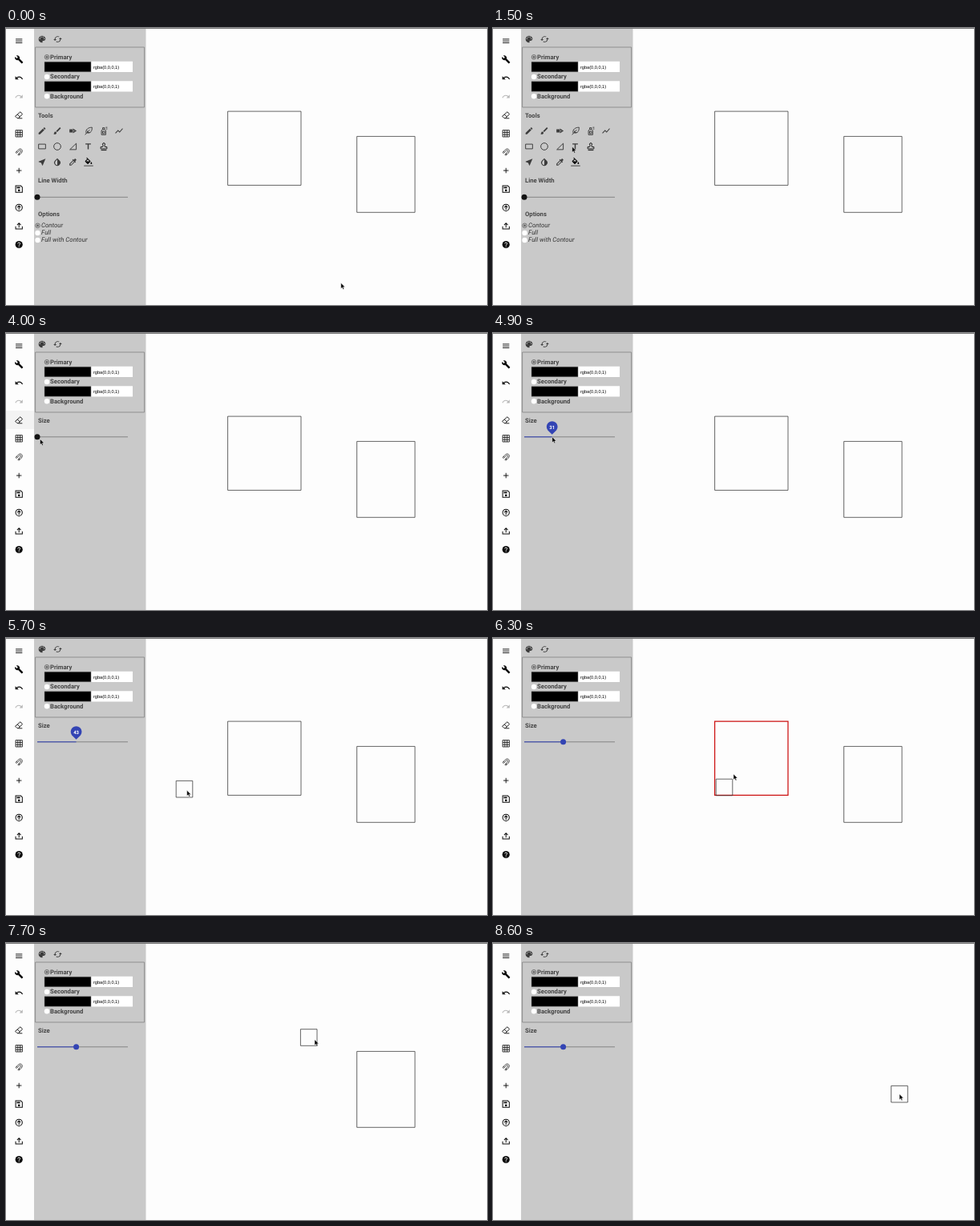
Write an HTML page that moves like this. It is 600 px wide and 346 px high and loops after 9 s.

```html
<!DOCTYPE html>
<html lang="en">
<head>
<meta charset="utf-8">
<title>Eraser tool</title>
<style>
  html, body { margin: 0; width: 100%; height: 100%; overflow: hidden; background: #fdfdfd; }
  svg { display: block; }
  text { font: 700 7.7px Roboto, sans-serif; fill: #444; text-rendering: geometricPrecision; }
  .option { font-size: 7.9px; font-weight: 400; font-style: italic; fill: #333; }
  .value { font: 5.6px "Liberation Sans", sans-serif; fill: #000; }
  #pinText { font-size: 6px; fill: #fff; text-anchor: middle; }
  .shape { fill: none; stroke: #333; stroke-width: .75; }
  .shape.red { stroke: #cc1010; stroke-width: 1.25; }
  .track { stroke: #7d7d7d; stroke-width: .9; }
</style>
</head>
<body>
<svg width="600" height="346" viewBox="0 0 600 346">
  <defs><clipPath id="button"><path d="M0 97h35v23H0z"/></clipPath></defs>
  <g id="hover" clip-path="url(#button)">
    <path id="hoverFill" d="M0 97h35v23H0z"/>
    <circle id="ripple" cx="20" cy="118" fill="#d6d6d6"/>
  </g>
  <path d="M35 0h139.5v346H35z" fill="#c9c9c9"/>
  <path d="M0 .5h600" stroke="#777"/>
  <path d="M36.6 24h136v75h-136z" fill="none" stroke="#888" stroke-width=".9"/>
  <path d="M48 42.3h58v12.4H48zM48 66.8h58v12.4H48z" stroke="#777" stroke-width=".5"/>
  <path d="M106.5 41.7H158v13.4h-51.5zM106.5 66.2H158v13.4h-51.5z" fill="#fff"/>
  <text class="value" x="109" y="50.5">rgba(0,0,0,1)</text>
  <text class="value" x="109" y="75">rgba(0,0,0,1)</text>
  <g id="common"></g>
  <g id="tools"></g>
  <g id="size">
    <text x="40" y="111.7">Size</text>
    <path class="track" d="M39 129.8h113"/>
    <path id="filled" stroke="#3344b4"/>
    <circle id="thumb" cy="129.8" r="3.5"/>
    <g id="pin">
      <path d="M0-3.2L-5.4-8.6A6.9 6.9 0 1 1 5.4-8.6z" fill="#3344b4"/>
      <text id="pinText" y="-10.4"></text>
    </g>
  </g>
  <path id="big" class="shape" d="M276.6 104.1h91.4v92.3h-91.4z"/>
  <path id="small" class="shape" d="M437.7 135.4h72.4v94.9h-72.4z"/>
  <path id="eraser" class="shape" d="M-10.3-10.3h20.6v20.6h-20.6z"/>
  <path id="arrow" d="M0 0v7l1.6-1.5 1.1 2.5 1.2-.5-1.1-2.4h2.2z" stroke="#fff" stroke-width=".4"/>
  <path id="hand" fill="#fff" stroke="#111" stroke-width=".8"
    d="M2.4.5q.9 0 .9 1v2.7l3 .7q1.1.3 1 1.4L6.8 9H3L.6 6q.2-.9 1-.4V1.4q0-.9.8-.9z"/>
</svg>
<script>
const $ = id => document.getElementById(id);

// Icons live on a 24-unit grid and are centred on x, y.
const icon = (x, y, fill, line = '', color = '#3c3c3c', width = 2, scale = .484) =>
  `<g transform="translate(${x} ${y}) scale(${scale}) translate(-12 -12)">
    <path d="${fill}" fill="${color}" fill-rule="evenodd"/>
    <path d="${line}" fill="none" stroke="${color}" stroke-width="${width}"/></g>`;
const side = (row, fill, line, width = 2.2, color = '#0c0c0c') =>
  icon(16.2, 16.2 + row * 23.12, fill, line, color, width, .46);
const label = (x, y, text, kind = '') => `<text class="${kind}" x="${x}" y="${y}">${text}</text>`;
const radio = (x, y, on) => on
  ? `<circle cx="${x}" cy="${y}" r="2.8" fill="#ccc" stroke="#666" stroke-width=".9"/><circle cx="${x}" cy="${y}" r="1.5" fill="#666"/>`
  : `<circle cx="${x}" cy="${y}" r="3.2" fill="#fff"/>`;

const disc = 'M12 2a10 10 0 0 1 0 20a10 10 0 0 1 0-20z';
const ring = 'M12 3a9 9 0 0 1 0 18a9 9 0 0 1 0-18z';

$('common').innerHTML = [
  side(0, '', 'M3 7h18M3 12h18M3 17h18', 2),
  side(1, 'M22.7 19l-9.1-9.1c.9-2.3.4-5-1.5-6.9-2-2-5-2.4-7.4-1.3L9 6 6 9 1.6 4.7C.4 7.1.9 10.1 2.9 12.1c1.9 1.9 4.6 2.4 6.9 1.5l9.1 9.1c.4.4 1 .4 1.4 0l2.3-2.3c.5-.4.5-1.1.1-1.4z'),
  side(2, 'M12.5 8c-2.65 0-5.05 1-6.9 2.6L2 7v9h9l-3.6-3.6c1.4-1.2 3.1-1.9 5.1-1.9 3.5 0 6.5 2.3 7.6 5.5l2.4-.8C21.1 11 17.1 8 12.5 8z'),
  side(3, 'M18.4 10.6C16.5 9 14.1 8 11.5 8c-4.6 0-8.6 3-10 7.2l2.4.8c1-3.2 4-5.5 7.6-5.5 1.9 0 3.7.7 5.1 1.9L13 16h9V7z', '', 2, '#b8b8b8'),
  side(4, '', 'M15.5 3.5l6 6L10.500 20.500H7L2 15.500zM8 11l7 6M10 21h11', 2),
  side(5, '', 'M3 3h18v18H3zM9 3v18M15 3v18M3 9h18M3 15h18', 1.8),
  side(6, '', 'M3 13L10 6C17-1 25 8 18.5 14.5l-7 7L9 19l7-7C19 8 15.5 5.5 12.5 8.5l-7 7zM5.5 10.5L8 13M11.5 16.5L14 19', 1.6),
  side(7, '', 'M5 12h14M12 5v14', 2),
  side(8, 'M6 6h9v4H6zM12 12.5a3 3 0 0 1 0 6a3 3 0 0 1 0-6z', 'M3 3h14l4 4v14H3z'),
  side(9, '', ring + 'M12 18V7M7.5 11.5L12 7l4.5 4.5'),
  side(10, '', 'M3 13v7h18v-7M12 16V4M7 9l5-5 5 5'),
  side(11, disc),
  side(11, '', 'M9 9.5a3 3 0 1 1 4.6 2.4q-1.6 1-1.6 3.3M12 17v2.2', 2, '#fff'),

  icon(45, 14, 'M12 3a9 9 0 0 0 0 18q2.5-.5 1.1-2.5-1-2.3 1.1-2.5H16q4.6-.4 5-5c0-4.4-4-8-9-8z'),
  '<path d="M42.3 13.3h.01M43.8 11.3h.01M46.2 11.3h.01M47.7 13.3h.01" stroke="#c9c9c9" stroke-width="1.4" stroke-linecap="round"/>',
  icon(64.5, 14, 'M19 8l-4 4h3c0 3.3-2.7 6-6 6-1 0-2-.2-2.8-.7l-1.5 1.5Q9.5 20 12 20c4.4 0 8-3.6 8-8h3zM6 12c0-3.3 2.7-6 6-6 1 0 2 .2 2.8.7l1.5-1.5Q14.5 4 12 4c-4.4 0-8 3.6-8 8H1l4 4 4-4z'),

  radio(51, 36.3, true), label(55, 39, 'Primary'),
  radio(51, 61), label(55, 63.3, 'Secondary'),
  radio(51, 85.3), label(55, 87.8, 'Background')
].join('');

$('tools').innerHTML = [
  label(40, 111.7, 'Tools'),
  icon(45, 128.5, 'M3 17.25V21h3.75L17.8 9.9l-3.7-3.7zM20.7 7q.6-.7 0-1.4l-2.3-2.3q-.7-.6-1.4 0l-1.9 1.8 3.8 3.8z'),
  icon(64, 128.5, 'M7 14c-1.7 0-3 1.3-3 3 0 1.3-1.2 2-2 2 .9 1.2 2.5 2 4 2 2.2 0 4-1.8 4-4 0-1.7-1.3-3-3-3zM20.7 4.6l-1.3-1.3q-.7-.6-1.4 0l-9 9 2.7 2.7 9-9q.6-.7 0-1.4z'),
  icon(83.5, 128.5, 'M3 8h8v8H3zM12 6l9.5 6-9.5 6zM14 11v2h2v-2z'),
  icon(103, 128.5, '', 'M3 22L15 9M6 18C3 8 12 3 21 3c0 9-3 16-13 14M9 12v4h6'),
  icon(122, 128.5, '', 'M6 22V11l3-3h5l3 3v11zM9 8V4h5v4M9 13h5v6H9zM17 3h4M18 7h3'),
  icon(141, 128.5, 'M3.5 18.5l6-6 4 4L22 6.9l-1.4-1.4-7.1 8-4-4L2 17z'),
  icon(45, 148, '', 'M3 6h18v12H3z'),
  icon(64, 148, '', ring),
  icon(83.5, 148, '', 'M4 20L20.5 4v16z'),
  icon(102.5, 148, 'M5 4v3h5.5v12h3V7H19V4z'),
  icon(122, 148, '', 'M12 3a3 3 0 0 0-3 3q2 5 0 7H4v5h16v-5h-5q-2-2 0-7a3 3 0 0 0-3-3zM5 21.5h14', '#161616'),
  icon(45, 167.5, 'M21 3L3 10.5v1l6.8 2.7 2.7 6.8h1z'),
  icon(64, 167.5, 'M17.7 7.9L12 2.3 6.3 7.9a8 8 0 1 0 11.4 0zM12 19.6A6 6 0 0 1 7.8 9.4L12 5.1z'),
  icon(83.5, 167.5, 'M20.7 5.6l-2.3-2.3q-.7-.6-1.4 0l-3.2 3.1-1.9-1.9-1.4 1.4 1.4 1.4L3 16.3V21h4.7l9-8.9 1.4 1.4 1.4-1.4-1.9-1.9 3.1-3.2q.6-.7 0-1.4zM6.9 19L5 17.1 13 9l2 1.9z'),
  icon(103, 167.5, 'M16.6 8.9L7.6 0 6.2 1.4l2.4 2.4-5.2 5.1q-.9 1 0 2.2l5.5 5.5q1.1.9 2.2 0l5.5-5.5q.9-1.2 0-2.2zM5.2 10L10 5.2l4.8 4.8zM19 11.5s-2 2.2-2 3.5a2 2 0 0 0 4 0c0-1.3-2-3.5-2-3.5z', '', '#000'),
  '<path d="M97.2 171.4h11.6v1.6H97.2z" fill="#777"/>',
  label(40, 193, 'Line Width'),
  '<path class="track" d="M39 211.3h113"/><circle cx="39" cy="211.3" r="3.5" fill="#141414"/>',
  label(40, 235, 'Options'),
  radio(39.5, 246.8, true), label(44, 248.8, 'Contour', 'option'),
  radio(39.5, 256), label(44, 257.9, 'Full', 'option'),
  radio(39.5, 265), label(44, 267.1, 'Full with Contour', 'option')
].join('');

// Pointer path: time, x, y
const path = [
  [900, 417.8, 318.5], [1000, 372, 296], [1200, 205, 186], [1300, 174.5, 166.5], [1400, 174.5, 166.5],
  [1600, 23, 130], [1800, 23, 130], [2100, 18.3, 116], [3700, 18.3, 116], [3800, 26, 122],
  [4000, 42.5, 132.5], [4200, 38.5, 129.5], [4400, 38.5, 129.5], [5100, 88, 130], [5200, 88, 130],
  [5300, 160, 165], [5400, 222.5, 188.7], [5600, 222.5, 188.7], [5700, 225.7, 190.3], [5900, 248, 203],
  [6100, 277, 203], [6300, 300, 170], [6500, 321.3, 123.3], [6600, 321.3, 123.3], [6700, 328, 121],
  [6900, 377.7, 118], [7600, 377.7, 118], [7700, 385, 120.7], [8000, 436, 148], [8300, 507, 188.7]
];

function pointer(t) {
  const i = path.findIndex(p => p[0] > t);
  if (i === 0) return path[0].slice(1);
  if (i < 0) return path[path.length - 1].slice(1);
  const [a, b] = [path[i - 1], path[i]];
  const u = (t - a[0]) / (b[0] - a[0]);
  return [a[1] + (b[1] - a[1]) * u, a[2] + (b[2] - a[2]) * u];
}

const show = (id, on) => $(id).setAttribute('visibility', on ? 'visible' : 'hidden');
const place = (id, x, y, k = 1) => $(id).setAttribute('transform', `translate(${x} ${y}) scale(${k})`);

function draw(t) {
  const [x, y] = pointer(t);
  const hand = t >= 1600 && t < 3900;
  show('hand', hand);
  show('arrow', !hand);
  place(hand ? 'hand' : 'arrow', x, y);

  // Button highlight and click ripple
  show('hover', t >= 2900 && t < 4300);
  $('hoverFill').setAttribute('fill', t < 3500 ? '#ebebeb' : '#f3f3f3');
  $('ripple').setAttribute('r', t < 3500 ? 11 + (t - 2900) / 20 : 0);

  $('tools').style.display = t < 3000 ? '' : 'none';
  $('size').style.display = t < 3000 ? 'none' : '';

  const drag = t < 4400 ? 0 : Math.min(1, Math.max(0, (x - 38.5) / 49.5));
  const value = Math.round(43 * drag);
  const knob = 39 + 1.13 * 43 * drag;
  const pin = t < 4600 ? 0 : Math.max(0, Math.min(1, (5900 - t) / 200));
  $('filled').setAttribute('d', `M39 129.8H${knob}`);
  $('thumb').setAttribute('cx', knob);
  $('thumb').setAttribute('fill', value ? '#3344b4' : '#141414');
  show('thumb', pin < 1);
  show('pin', pin > 0);
  place('pin', knob, 130, pin);
  $('pinText').textContent = value;

  // The eraser trails the pointer by one step
  const [ex, ey] = pointer(t - 100);
  show('eraser', t >= 5500);
  place('eraser', ex, ey);
  show('big', t < 6800);
  show('small', t < 8600);
  $('big').classList.toggle('red', t >= 5500 && ex > 266);
  $('small').classList.toggle('red', ex > 427 && t >= 7700);
}

function frame() {
  draw(Math.floor(performance.now() % 9000 / 100) * 100);
  requestAnimationFrame(frame);
}
frame();
</script>
</body>
</html>
```
